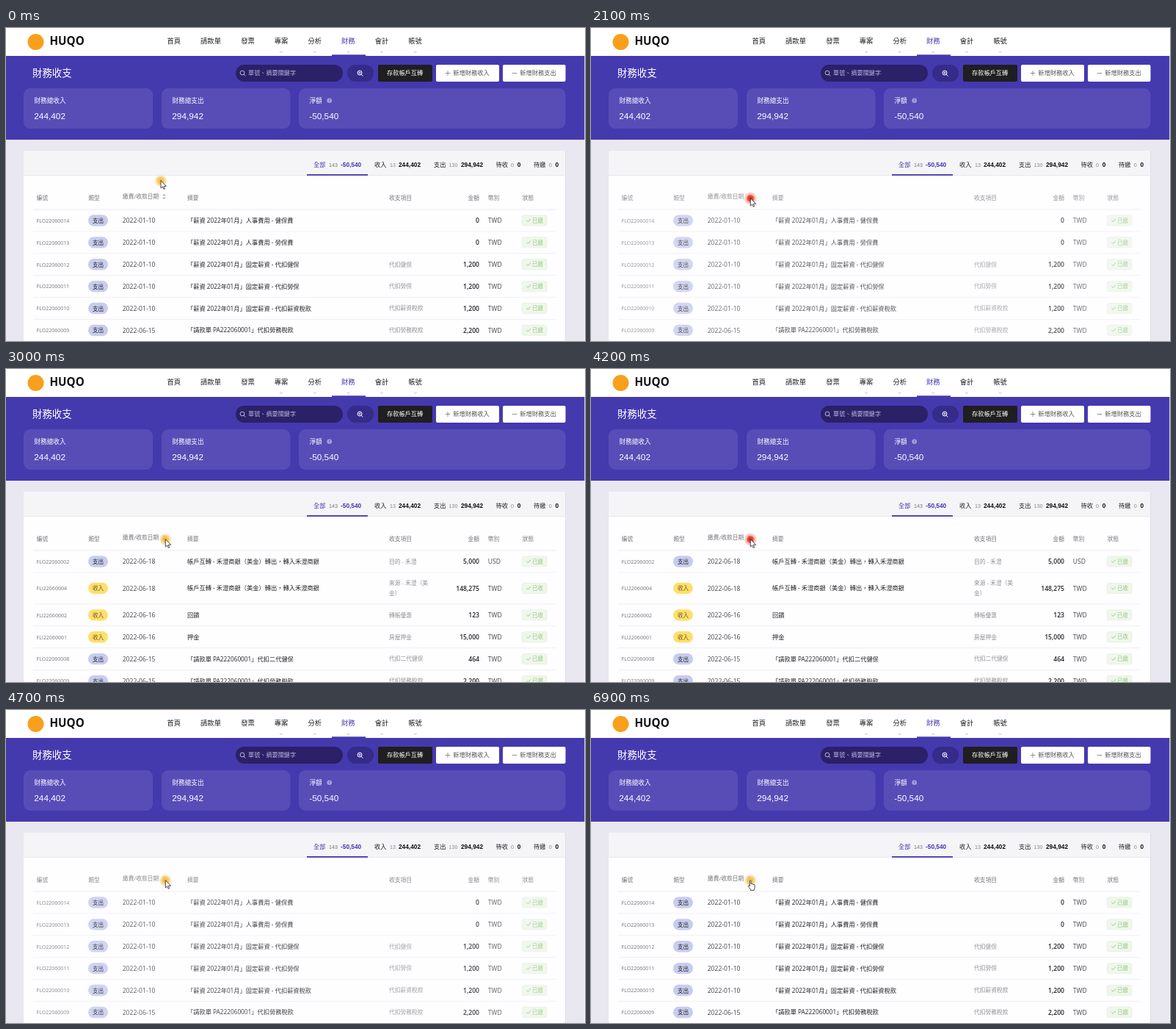
Write an HTML page that moves like this. It is 789 by 426 pixels and loops after 7000 ms.

```html
<!DOCTYPE html>
<html lang="zh-Hant">
<head>
<meta charset="utf-8">
<title>財務收支</title>
<style>
html, body { margin: 0; width: 100%; height: 100%; overflow: hidden; background: #fff; }
svg { display: block; width: 789px; height: 426px; }
text { font-family: "Open Sans", "Noto Sans CJK TC", "Noto Sans CJK", "Noto Sans CJK JP", sans-serif; white-space: pre; }
text.arial { font-family: "Liberation Sans", Arial, sans-serif; }
</style>
</head>
<body>
<svg id="stage" viewBox="0 0 789 426" xmlns="http://www.w3.org/2000/svg"></svg>
<script>
const LOOP = 7000, STEP = 100;
const PURPLE = '#4539ae';

const rect = (x, y, w, h, fill, rx = 0, extra = '') =>
  `<rect x="${x}" y="${y}" width="${w}" height="${h}" rx="${rx}" fill="${fill}" ${extra}/>`;
const path = (d, stroke, width = 0.9, fill = 'none') =>
  `<path d="${d}" fill="${fill}" stroke="${stroke}" stroke-width="${width}" stroke-linecap="round" stroke-linejoin="round"/>`;

// Text placed by the vertical centre of its glyphs.
function text(str, x, cy, size, fill, { weight = 400, anchor = 'start', cls = '' } = {}) {
  return `<text class="${cls}" x="${x}" y="${(cy + size * 0.36).toFixed(2)}" font-size="${size}" ` +
    `font-weight="${weight}" fill="${fill}" text-anchor="${anchor}">${str}</text>`;
}
const number = (str, x, cy, size, fill, weight = 400) =>
  text(str, x, cy, size, fill, { weight, cls: 'arial' });

function navBar() {
  const items = ['首頁', '請款單', '發票', '專案', '分析', '財務', '會計', '帳號'];
  const centers = [228.7, 279, 329.5, 375, 420.7, 466.3, 512, 557.6];
  let out = rect(0, 0, 789, 38, '#fff') +
    '<circle cx="40.5" cy="19" r="11" fill="#f8a01c"/>' +
    text('HUQO', 59.5, 18, 15.2, '#111', { weight: 700 });
  items.forEach((label, i) => {
    const x = centers[i];
    out += text(label, x, 17.6, 9.3, i === 5 ? PURPLE : '#222', { anchor: 'middle' });
    if (i > 2) out += path(`M${x - 1.6} 32l1.6 1.5l1.6 -1.5`, '#aaa', 0.8);
  });
  return out + rect(444, 36.3, 46, 1.9, PURPLE);
}

function banner() {
  const bold = { weight: 500 };
  const button = (x, w, label, plus) =>
    rect(x, 50, w, 23, '#fff', 2) +
    path(`M${x + 13} 61.5h6` + (plus ? `m-3 -3v6` : ''), '#777', 0.8) +
    text(label, x + 23.3, 61.5, 8.25, '#555');
  const card = (x, w, label, value) =>
    rect(x, 82, w, 55, '#584db7', 9) +
    text(label, x + 14.5, 99, 8.6, '#fff', bold) +
    number(value, x + 14.3, 119.7, 11.8, '#fff');
  return rect(0, 38, 789, 114, PURPLE) +
    text('財務收支', 36, 61, 13.4, '#fff', bold) +
    rect(313, 50, 146, 23, '#2a2167', 11.5) +
    '<circle cx="322" cy="61" r="2.9" fill="none" stroke="#c9c6e6" stroke-width=".9"/>' +
    path('M324.1 63.2l1.9 2', '#c9c6e6') +
    text('單號、摘要關鍵字', 330, 61.5, 8.15, '#b9b5dc') +
    rect(465, 50, 36, 23, '#352b88', 11.5) +
    '<circle cx="482" cy="61" r="3" fill="none" stroke="#fff" stroke-width="1"/>' +
    path('M484.2 63.3l2 2M480.7 61h2.6M482 59.7v2.6', '#fff') +
    rect(507, 50, 74, 23, '#1f1e20', 2) +
    text('存款帳戶互轉', 519, 61.5, 8.2, '#fff', bold) +
    button(586, 86, '新增財務收入', true) +
    button(677, 85.5, '新增財務支出', false) +
    card(24, 176, '財務總收入', '244,402') +
    card(212, 175.5, '財務總支出', '294,942') +
    card(399, 363.5, '淨額', '-50,540') +
    '<circle cx="440.7" cy="98.7" r="3.3" fill="#a9a2da"/>' +
    text('?', 440.7, 98.8, 5, '#584db7', { weight: 700, anchor: 'middle' });
}

function tabs() {
  const tab = (label, x, count, cx, sum, sx, on) =>
    text(label, x, 186, 8.2, on ? PURPLE : '#222') +
    number(count, cx, 186.2, 7.2, on ? '#777' : '#888') +
    number(sum, sx, 186, 8.3, on ? PURPLE : '#111', 700);
  return rect(0, 152, 789, 274, '#e9e7ef') +
    rect(24, 167, 739, 259, '#e0dee7', 2) +
    rect(24, 167, 738, 259, '#fefdff', 2) +
    rect(24, 167, 738, 33.5, '#f5f4f7', 2) +
    rect(24, 200, 738, 0.8, '#e6e5ea') +
    tab('全部', 419, '143', 440, '-50,540', 456, true) +
    tab('收入', 502, '13', 523, '244,402', 535) +
    tab('支出', 583, '130', 603.5, '294,942', 620) +
    tab('待收', 667.5, '0', 688, '0', 696.7) +
    tab('待繳', 719, '0', 739.8, '0', 748.5) +
    rect(410, 199, 83, 1.8, PURPLE);
}

function tableHead(sorted) {
  const cell = (label, x, cy = 231, anchor = 'start') => text(label, x, cy, 7.75, '#777', { anchor });
  return cell('編號', 41.7) + cell('類型', 112.3) + cell('繳費/收款日期', 159, 229.6) +
    cell('摘要', 247) + cell('收支項目', 522) + cell('金額', 645, 231, 'end') +
    cell('幣別', 656.7) + cell('狀態', 703.7) +
    `<path d="M213 228.6h5l-2.5 -2.8z" fill="#b5b5bb"/>` +
    `<path d="M213 230.4h5l-2.5 2.8z" fill="${sorted ? PURPLE : '#b5b5bb'}"/>` +
    rect(37, 246.6, 712, 0.8, '#e6e5ea');
}

function tableRow([id, date, note, item, amount, unit = 'TWD'], top, height) {
  const cy = top + height / 2;
  const income = id.startsWith('FLI');
  const lines = item.split('|');
  const itemText = lines.map((line, i) =>
    text(line, 522, cy + (i - (lines.length - 1) / 2) * 14, 7.75, '#929292')).join('');
  return text(id, 41.5, cy + 0.3, 7.05, '#777') +
    rect(112, cy - 7.7, 27, 15.4, income ? '#ffdf6b' : '#c8ccef', 7.7) +
    text(income ? '收入' : '支出', 125.5, cy + 0.3, 7.6, income ? '#6b5a1c' : '#222', { anchor: 'middle' }) +
    text(date, 158.7, cy, 8.6, '#444') +
    text(note, 247, cy, 8.24, '#222') + itemText +
    text(amount, 645, cy, 8.6, '#222', { weight: 600, anchor: 'end' }) +
    text(unit, 656.7, cy, 8.6, '#444') +
    rect(703.4, cy - 7, 33.4, 14, '#eff7eb', 2, 'stroke="#e1f0d9" stroke-width=".7"') +
    path(`M709.7 ${cy}l1.7 1.8l3.2 -3.7`, '#8fc67b') +
    text(income ? '已收' : '已繳', 717, cy, 7.5, '#95c983') +
    rect(37, top + height - 0.4, 712, 0.8, '#ededf1');
}

function table(rows, sorted) {
  let top = 247, out = tableHead(sorted);
  for (const row of rows) {
    const height = row[3].includes('|') ? 43 : 29.9;
    out += tableRow(row, top, height);
    top += height;
  }
  return out;
}

const pay = '「薪資 2022年01月」', request = '「請款單 PA222060001」';
const transfer = '帳戶互轉 - 禾澄商銀（美金）轉出，轉入禾澄商銀';
const jan = '2022-01-10', labour = ['FLO22060009', '2022-06-15', request + '代扣勞務稅款', '代扣勞務稅款', '2,200'];
const oldest = [
  ['FLO22060014', jan, pay + '人事費用 - 健保費', '', '0'],
  ['FLO22060013', jan, pay + '人事費用 - 勞保費', '', '0'],
  ['FLO22060012', jan, pay + '固定薪資 - 代扣健保', '代扣健保', '1,200'],
  ['FLO22060011', jan, pay + '固定薪資 - 代扣勞保', '代扣勞保', '1,200'],
  ['FLO22060010', jan, pay + '固定薪資 - 代扣薪資稅款', '代扣薪資稅款', '1,200'],
  labour
];
const newest = [
  ['FLO22060002', '2022-06-18', transfer, '目的 - 禾澄', '5,000', 'USD'],
  ['FLI22060004', '2022-06-18', transfer, '來源 - 禾澄（美|金）', '148,275'],
  ['FLI22060002', '2022-06-16', '回饋', '轉帳優惠', '123'],
  ['FLI22060001', '2022-06-16', '押金', '房屋押金', '15,000'],
  ['FLO22060008', '2022-06-15', request + '代扣二代健保', '代扣二代健保', '464'],
  labour
];

const glow = (id, stops) => `<radialGradient id="${id}">` + stops.map(([at, color, alpha]) =>
  `<stop offset="${at}" stop-color="${color}" stop-opacity="${alpha}"/>`).join('') + '</radialGradient>';

const pointer = `
  <g id="cursor">
    <circle id="halo" r="9.5" fill="url(#idle)"/>
    <g id="arrow">${path('M0 0v10l2.3 -2.1l1.6 3.5l1.6 -.7l-1.6 -3.4h3.1z', '#222', 0.8, '#fff')}</g>
    <g id="hand">${path('M-.9 6.8v-5.6q0 -1.1 .9 -1.1t.9 1.1v3.4q1.6 -.6 1.8 .5q1.5 -.5 1.7 .6q1.5 -.3 1.5 1v2.8q0 1.6 -1 2.5v1.4h-4.7v-1.2l-2.9 -3.6q-.7 -1.3 .2 -1.8q.8 -.3 1.6 .8z', '#222', 0.8, '#fff')}</g>
  </g>`;

const stage = document.getElementById('stage');
stage.innerHTML =
  '<defs>' +
  glow('idle', [[0, '#f2b632', 0.95], [0.45, '#f5c14e', 0.85], [0.75, '#f9d98c', 0.5], [1, '#fdf0cc', 0]]) +
  glow('press', [[0, '#e3231c', 1], [0.42, '#ea3c32', 0.9], [0.6, '#f39a86', 0.65], [0.85, '#f7c3b0', 0.5], [1, '#fbe3d8', 0]]) +
  '</defs>' +
  navBar() + banner() + tabs() +
  `<g id="table"><g id="oldest">${table(oldest, false)}</g><g id="newest">${table(newest, true)}</g></g>` +
  pointer + rect(788.3, 0, 0.7, 426, '#fff');

const [tableEl, oldestEl, newestEl, cursor, halo, arrow, hand] =
  ['table', 'oldest', 'newest', 'cursor', 'halo', 'arrow', 'hand'].map(id => document.getElementById(id));

const moveX = [[0, 211], [600, 213], [800, 213.5], [1300, 218.5], [1500, 217.3]];
const moveY = [[0, 208], [600, 214], [800, 215], [1300, 231], [1500, 232]];
const fade = [[2000, 1], [2400, 0.12], [2700, 0.12], [2800, 0.5], [3000, 1],
  [4200, 1], [4400, 0.12], [4500, 0.12], [4600, 0.5], [4700, 0.85], [4900, 1]];

function track(keys, t) {
  const i = keys.findIndex(([at]) => at > t);
  if (i < 0) return keys[keys.length - 1][1];
  if (i === 0) return keys[0][1];
  const [t0, a] = keys[i - 1], [t1, b] = keys[i];
  return a + (b - a) * (t - t0) / (t1 - t0);
}
const within = (t, ...spans) => spans.some(([from, to]) => t >= from && t < to);
const show = (el, on) => el.setAttribute('visibility', on ? 'visible' : 'hidden');

function draw(t) {
  const sorted = within(t, [2800, 4600]);
  const pointing = within(t, [900, 2100], [3300, 4200], [5000, LOOP]);
  const pressed = within(t, [1900, 2200], [4000, 4400]);
  tableEl.setAttribute('opacity', track(fade, t));
  show(oldestEl, !sorted);
  show(newestEl, sorted);
  show(hand, pointing);
  show(arrow, !pointing);
  halo.setAttribute('fill', `url(#${pressed ? 'press' : 'idle'})`);
  cursor.setAttribute('transform', `translate(${track(moveX, t)} ${track(moveY, t)})`);
}

const start = performance.now();
function frame(now) {
  const t = Math.max(0, now - start) % LOOP;
  draw(Math.floor(t / STEP) * STEP);
  requestAnimationFrame(frame);
}
draw(0);
requestAnimationFrame(frame);
</script>
</body>
</html>
```
